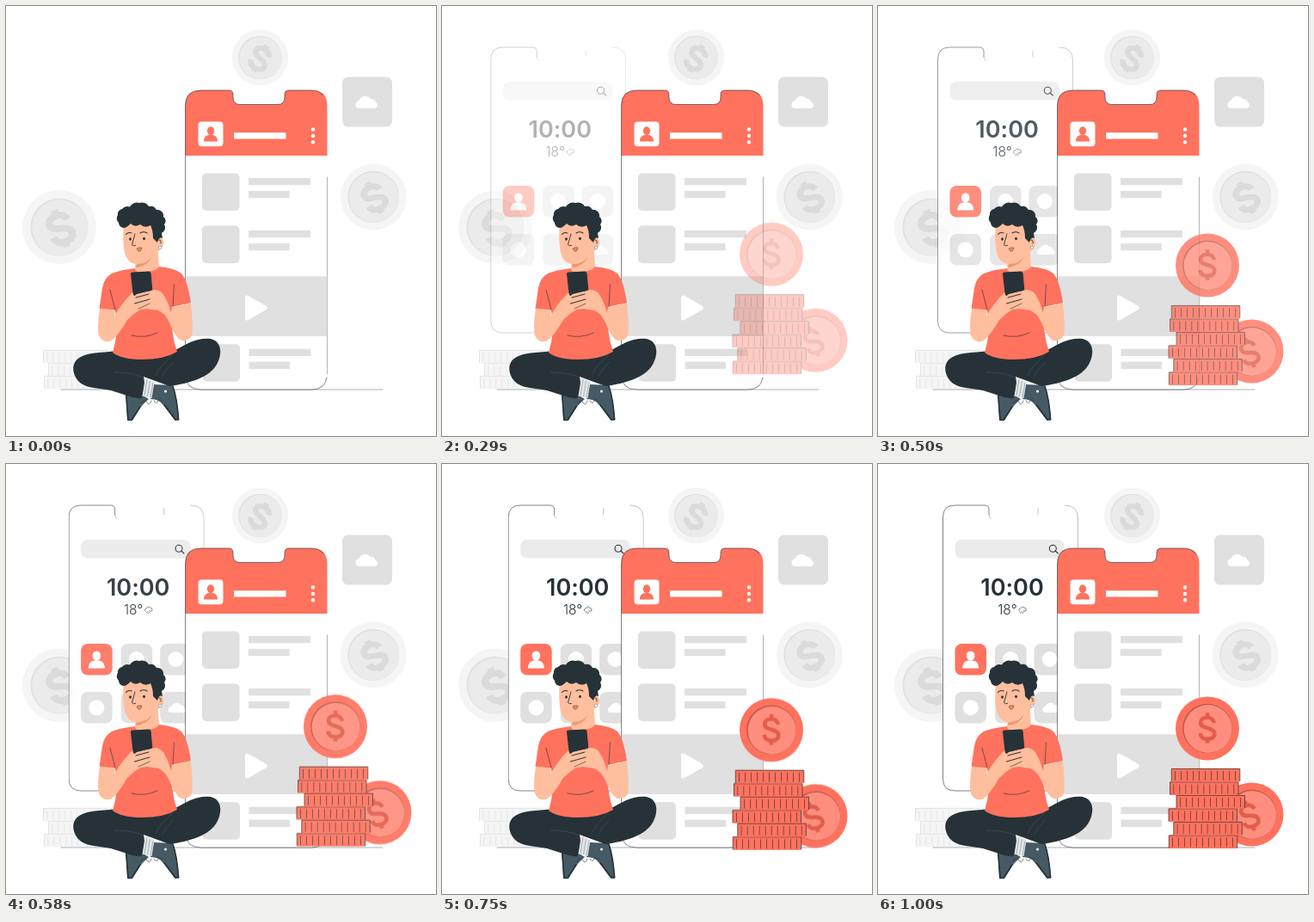
Animation of 500 by 500 pixels, one loop 1.04 s. Source, as an HTML page:

```html
<!DOCTYPE html>
<html lang="en">
<head>
<meta charset="utf-8">
<title>Mobile payments</title>
<style>
html, body { margin: 0; width: 100%; height: 100%; overflow: hidden; background: #fff; }
svg { display: block; width: 100vw; height: 100vh; }
text { font-family: Inter, sans-serif; font-feature-settings: "calt" 0; fill: #263238; text-anchor: middle; }
.grey { --rim: #f5f5f5; --edge: #e0e0e0; --face: #ebebeb; --sign: #dbdbdb; --bold: 6.2; --tick: #e0e0e0; }
.coral { --rim: #ff725e; --edge: #b8574a; --face: #ff8e7e; --sign: #e35d4b; --bold: 4.6; --tick: #4b3634; }
.rim { fill: var(--rim); }
.edge { fill: var(--edge); }
.face { fill: var(--face); }
.sign { fill: none; stroke: var(--sign); stroke-width: var(--bold); }
.tick { fill: none; stroke: var(--tick); }
.line { fill: none; stroke: #263238; stroke-width: .6; stroke-linecap: round; stroke-linejoin: round; }
.thin { stroke-width: .3; }
.ink { fill: #263238; }
.red { fill: #ff725e; }
.skin { fill: #ffbe9d; }
.box { fill: #e0e0e0; }
.white { fill: #fff; }
.slide, .drop { animation: 1040ms cubic-bezier(.345, .089, .499, 1.367) infinite; }
.slide { animation-name: slide; }
.drop { animation-name: drop; }
/* The entry overshoots, then rests briefly before the loop restarts. */
@keyframes slide {
  0% { opacity: 0; transform: translateX(-29.86px); }
  94.2%, 100% { opacity: 1; transform: none; }
}
@keyframes drop {
  0% { opacity: 0; transform: translateY(-29.86px); }
  94.2%, 100% { opacity: 1; transform: none; }
}
</style>
</head>
<body>
<svg viewBox="0 0 500 500">
  <defs>
    <g id="disc">
      <circle class="rim" r="37"/>
      <circle class="edge" r="28.8"/>
      <circle class="face" cx=".6" cy=".5" r="28"/>
    </g>
    <g id="dollar" class="sign">
      <path d="M8-6C7-11 3-12.5 0-12.5C-5-12.5-8-10-8-6.5C-8-2-4-1 0 0C5 1.2 8.5 3 8.5 7C8.5 11 5 13 0 13C-5 13-8 10.5-8.500 6M0-18V-12M0 13V18"/>
    </g>
    <g id="roll">
      <rect class="rim" width="79.5" height="15.5" rx="1"/>
      <path class="tick" stroke-width=".8" d="M0 15V.4H79.5V15"/>
      <path class="tick" stroke-width="11" stroke-dasharray=".7 6.3" d="M4 8.5H78"/>
    </g>
    <g id="person">
      <ellipse cy="-4.2" rx="4.6" ry="5.4"/>
      <path d="M-9 9.5C-9 4-6 1.6-2.6 1H2.6C6 1.6 9 4 9 9.5Z"/>
    </g>
    <path id="cloud" d="M-10 7A4.4 4.4 0 0 1-9.5-1.7A8 8 0 0 1 4.3-4A5 5 0 0 1 9.6 0A3.7 3.7 0 0 1 10 7Z"/>
    <rect id="tile" class="box" width="36.5" height="36.5" rx="8"/>
    <g id="row" class="box">
      <rect width="43.5" height="43.5" rx="5"/>
      <path d="M54 5.5H126V13.7H54ZM54 20.5H101.5V28.7H54Z"/>
    </g>
  </defs>

  <g class="grey">
    <g transform="translate(295.5 60)"><use href="#disc" transform="scale(.88)"/><use href="#dollar" transform="translate(0 1) rotate(27) scale(1.05 .95)"/></g>
    <g transform="translate(427.3 222)"><use href="#disc" transform="scale(1.04)"/><use href="#dollar" transform="translate(1 1) rotate(-26) scale(1.2 1.08)"/></g>
    <g transform="translate(62 257.2)"><use href="#disc" transform="scale(1.16)"/><use href="#dollar" transform="translate(1.5 1.5) rotate(-19) scale(1.35 1.25)"/></g>
    <use href="#roll" x="43.5" y="400"/>
    <use href="#roll" x="49.5" y="415"/>
    <use href="#roll" x="44.5" y="430"/>
  </g>
  <rect class="box" x="391" y="82.5" width="58" height="58" rx="7"/>
  <use href="#cloud" class="white" transform="translate(420 112)"/>
  <path class="line" stroke-opacity=".65" d="M64 446H438"/>

  <g class="slide">
    <path class="white" d="M75.5 62Q75.5 48 89.5 48H124Q129 48 129 53V58Q129 65.5 136.5 65.5H178Q186 65.5 186 58V53Q186 48 191 48H218.5Q232.5 48 232.5 62V366Q232.5 380 218.5 380H89.5Q75.5 380 75.5 366Z"/>
    <path class="line" d="M129 59V53Q129 48 124 48H89.5Q75.5 48 75.5 62V366Q75.5 380 89.5 380H208"/>
    <path class="line thin" d="M129 59Q129.500 62 131 63.500M186 59V52M217 48Q232.500 48 232.500 63V110"/>
    <rect x="89.5" y="88" width="127.5" height="21.5" rx="8" fill="#ebebeb"/>
    <path class="line" style="stroke-width:1.1" d="M199.300 98.200a4 4 0 1 0 8 0a4 4 0 1 0-8 0M206.200 101L209.300 104"/>
    <text x="156" y="153" font-size="27" font-weight="600">10:00</text>
    <text x="150.500" y="174.500" font-size="15.500" font-weight="300">18°</text>
    <path class="line" d="M164.500 171.500Q162.500 168.500 165.500 167.800Q167.500 164.500 170 167Q173 167.500 172.300 170.500Q171 172 169 170.500M166 173.500L167 171.500M168 174L169 172"/>
    <rect class="red" x="89.500" y="209" width="36.500" height="36.500" rx="8"/>
    <use href="#person" class="white" transform="translate(107.700 227.500) scale(1.05)"/>
    <use href="#tile" x="136" y="209"/>
    <use href="#tile" x="181.500" y="209"/>
    <use href="#tile" x="89.500" y="265"/>
    <use href="#tile" x="136" y="265"/>
    <use href="#tile" x="181.500" y="265"/>
    <g class="white">
      <circle cx="154.200" cy="227" r="9"/>
      <circle cx="199.700" cy="227" r="9"/>
      <circle cx="107.700" cy="283.300" r="9"/>
      <use href="#cloud" transform="translate(202 283.500) scale(.8)"/>
    </g>
  </g>

  <g>
    <path class="white" d="M208.500 116Q208.500 98 226.500 98H355.500Q373.500 98 373.500 116V428Q373.500 446 355.500 446H226.500Q208.500 446 208.500 428Z"/>
    <path class="red" d="M208.500 174V116Q208.500 98 226.500 98H259Q264 98 264 103V106Q264 114.500 272 114.500H316Q324 114.500 324 106V103Q324 98 329 98H355.500Q373.500 98 373.500 116V174Z"/>
    <path class="line" d="M373 432Q371 446 355.500 446H226.500Q208.500 446 208.500 428V116Q208.500 98 226.500 98H259Q264 98 264 103V106Q264 114.500 272 114.500H316Q324 114.500 324 106V103Q324 98 329 98H355.500Q364 98 369 104"/>
    <path class="line" stroke-opacity=".6" d="M373.500 199V428"/>
    <g class="white">
      <rect x="223.500" y="134.500" width="29" height="28.700" rx="4"/>
      <path d="M265 147.300H325.500V154.500H265Z"/>
      <circle cx="357" cy="143.500" r="2.200"/>
      <circle cx="357" cy="151" r="2.200"/>
      <circle cx="357" cy="158.300" r="2.200"/>
    </g>
    <use href="#person" class="red" transform="translate(238 149) scale(.9)"/>
    <use href="#row" x="228" y="194.500"/>
    <use href="#row" x="228" y="255.500"/>
    <use href="#row" x="228.500" y="393.300"/>
    <path class="box" d="M209 314.300H373.200V384H209Z"/>
    <path class="white" d="M278 339.500Q278 335 282 337L302 348.500Q306 351 302 353.500L282 365Q278 367 278 362.500Z"/>
  </g>

  <g class="coral drop">
    <g transform="translate(434.500 407.500)"><use href="#disc"/><use href="#dollar" transform="translate(-2.500 1.500) rotate(-18)"/></g>
    <use href="#roll" x="338.300" y="431.500"/>
    <use href="#roll" x="343.800" y="416"/>
    <use href="#roll" x="338" y="400.500"/>
    <use href="#roll" x="347" y="385"/>
    <use href="#roll" x="339.500" y="369.500"/>
    <use href="#roll" x="341.300" y="354"/>
    <g transform="translate(383 307.500)"><use href="#disc"/><use href="#dollar" transform="translate(0 -.5) scale(.98)"/></g>
  </g>

  <g>
    <!-- legs and feet -->
    <path fill="#455a64" d="M139 448L158 452L166 457Q158 464 155 469L147 482H141Q140 463 139 448Z"/>
    <path fill="#455a64" d="M172 440L194 441Q198 452 201.500 481L196.500 482L183 464Q178 457 168 457Z"/>
    <path class="line" style="stroke-width:1.600" d="M139.500 449L142 481.500H146L156 466M194 442Q199 456 200.500 481H197L184 464"/>
    <path class="line" d="M157 462Q161 456 164 461T169 459M172 459Q175 464 177 459T182 463"/>
    <circle class="white" cx="185.500" cy="448" r="1.500"/>
    <path class="ink" d="M126 401.500C110 403 95 403 86 408.500C76 414 76 427 84 436C92 445 108 444 122 447L147 455L157 456.500Q163 445 160 431L190 442C213 439 238 432 246 415C252 402 250 390 238 387C222 385 208 394 197 400Z"/>
    <path d="M162 432L172.500 437L169.500 456L158.500 453.500Z" fill="#e6e6e6"/>
    <path d="M164 434L161 453M167.500 436L164.500 454M171 438L168 455" fill="none" stroke="#90a4ae" stroke-width=".8"/>
    <path d="M126 426Q150 426 161 433M174 430Q178 419 194 406M182 430Q187 420 195 414" fill="none" stroke="#455a64" stroke-width=".5"/>

    <!-- neck and shirt -->
    <path class="red" d="M150 305Q132 307 123 311Q114 316 112 328L108.500 352L127 354Q132 377 124 403Q135 411 158 411Q184 411 199 402Q191 380 193 350L215 345Q211 319 204 311Q197 305 178 303Z"/>
    <path class="skin" d="M151 293L150 306Q151 311 163 309Q176 308 178 303L176 276Z"/>
    <path class="line" d="M121 330L127 353M195.500 324L194 349M146 383Q161 387 176 380"/>

    <!-- arms and hands -->
    <path class="skin" d="M109 351.500L127 353.500L126 361Q134 346 147 333Q150 328 153 331L162 329L171 332L169 340L158 352Q149 357 141 365Q131 383 122 389.500Q112 393 107.500 382Q106 371 109 351.500Z"/>
    <path class="ink" d="M145 311.500Q144.500 309.800 147 309.500L166 308.500Q168.300 308.500 168.600 311L170.500 332Q170.500 334.500 168 335L150 337Q148 337 147.500 334Z"/>
    <path class="skin" d="M215 345.500L193 350.500L192 357Q188 342 182 334Q176 328 168 331L152 335Q148 337 152 339L148 343Q148 347 154 346L151 350Q154 354 164 352L177 354Q184 356 190 368Q196 384 203 388.500Q212 391 216 383Q218 375 215 345.500Z"/>
    <path class="line" style="stroke-width:1" d="M151 339L166 335M149.500 346L167 341"/>
    <path class="line" d="M154 352L167 346"/>
    <path class="ink" d="M149 329L167 327L169 331L151 334Z"/>

    <!-- head -->
    <path class="skin" d="M137 253Q135 274 138 287Q141 299 151 300Q163 301 170 291L177 285Q185 280 182.500 272Q180 267 175 271V250Z"/>
    <path d="M152 300Q163 301 170 291Q165 303 151 304Z" fill="#eb996e"/>
    <path class="ink" d="M137 258A6 6 0 0 1 131 252A7 7 0 0 1 130 243A6 6 0 0 1 135 236A8 8 0 0 1 144 233.500A9 9 0 0 1 155 229A9 9 0 0 1 166 233A8 8 0 0 1 175 237A7 7 0 0 1 183 245A6 6 0 0 1 184 254A7 7 0 0 1 181 264L182 270Q178 268 176 275L171 270Q171 261 168 255Q162 259 156 254Q150 258 145 253Q140 258 137 258Z"/>
    <path class="line" style="stroke-width:1.100" d="M139.500 265.500Q142 262.500 146 264M156 264Q160 261.500 164 264"/>
    <path class="line" style="stroke-width:.9" d="M150 265L146.500 277.500Q148 279.500 150.500 278.500M178 272Q181 272 180 276"/>
    <ellipse class="ink" cx="144.500" cy="271" rx="1.400" ry="1.800"/>
    <ellipse class="ink" cx="160.500" cy="270.500" rx="1.400" ry="1.800"/>
    <path d="M152 282Q155 280 158 281Q157.500 285 155 285.500Q152.500 284.500 152 282Z" fill="#ed8a5c" stroke="#263238" stroke-width=".4"/>
    <circle class="white" cx="179" cy="281" r="1.800" stroke="#607078" stroke-width=".5"/>
  </g>
</svg>
</body>
</html>
```
